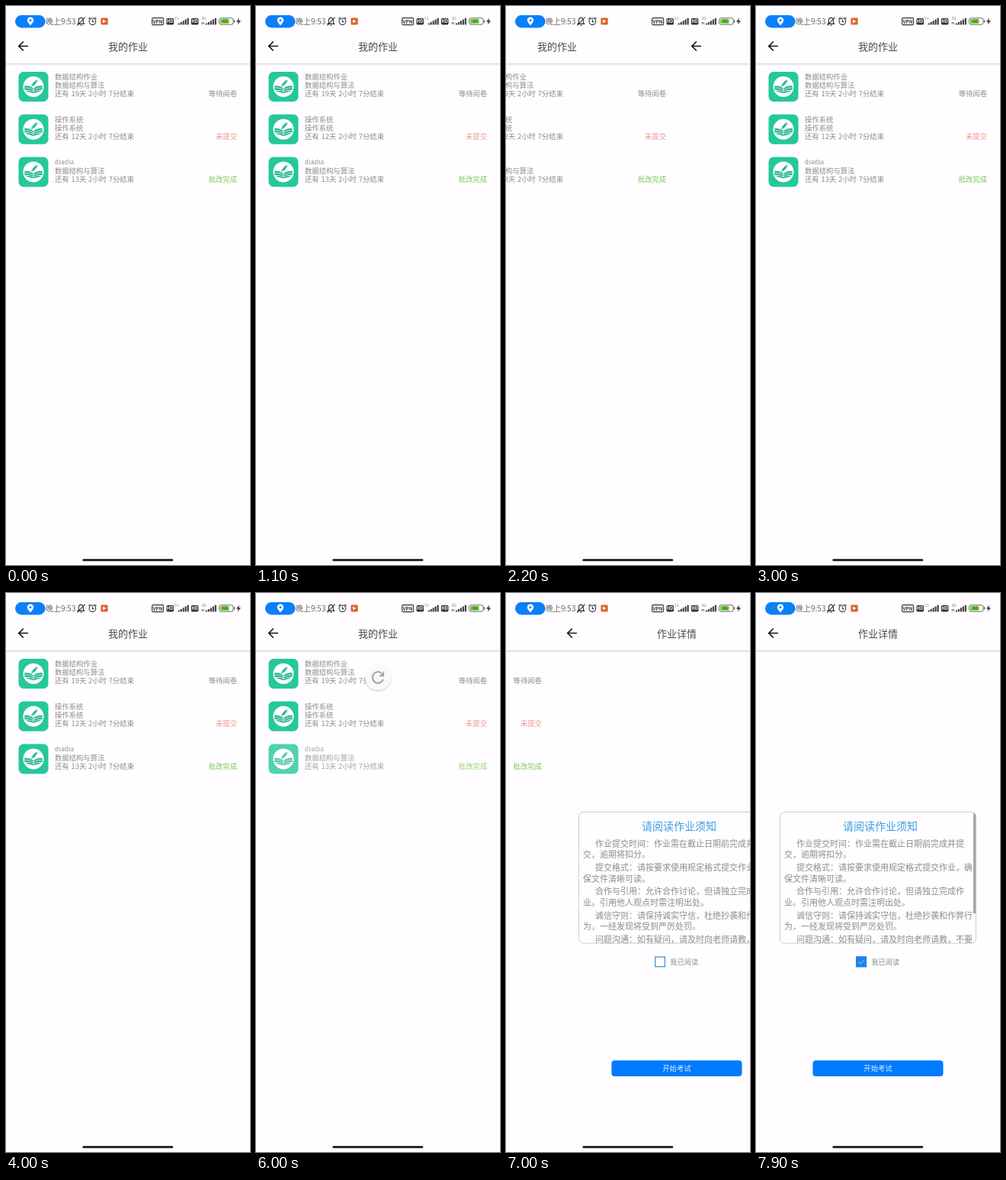
Animation of 320x731 px, one loop 8000 ms. Source, as an HTML page:

```html
<!DOCTYPE html>
<html lang="zh-CN">
<head>
<meta charset="utf-8">
<title>我的作业</title>
<style>
  html, body { margin: 0; width: 100%; height: 100%; overflow: hidden; background: #fffdff; }
  svg { display: block; width: 100%; height: 100%; }
  text { font-family: "Noto Sans CJK SC", "Noto Sans CJK", sans-serif; font-weight: 300; word-spacing: .8px; }
</style>
</head>
<body>
<svg viewBox="0 0 320 731" xmlns="http://www.w3.org/2000/svg">
  <defs>
    <linearGradient id="edge" x1="0" y1="0" x2="0" y2="1">
      <stop offset="0" stop-color="#d9d7d9"/>
      <stop offset="1" stop-color="#d9d7d9" stop-opacity="0"/>
    </linearGradient>
    <filter id="soft" x="-40%" y="-40%" width="180%" height="180%">
      <feDropShadow dx="0" dy="1" stdDeviation="1.3" flood-opacity=".25"/>
    </filter>
    <clipPath id="cardClip"><rect x="31.5" y="286.5" width="257" height="171.5" rx="6"/></clipPath>
    <path id="back" d="M29 52.5H17M22.8 46.5L16.8 52.5L22.8 58.5" fill="none" stroke="#161616" stroke-width="1.7"/>
    <g id="icon">
      <rect width="39" height="39" rx="6.5" fill="#25c89b"/>
      <circle cx="19.5" cy="19.5" r="13.5" fill="#fff"/>
      <g fill="#25b58f">
        <path d="M7.8 18.4Q14.5 17.8 19 21.4V26Q14 23 7.8 23.8Z"/>
        <path d="M31.2 18.4Q24.5 17.8 20 21.4V26Q25 23 31.2 23.8Z"/>
        <path d="M8.8 25Q15 23.8 19.5 26.8Q24 23.8 30.2 25L19.5 28.2Z"/>
        <path d="M16.2 20L17 16.6L23 10L25.6 12.3L19.6 18.8Z" stroke="#fff" stroke-width=".6"/>
      </g>
      <path d="M8.2 21Q14 20.2 18.8 23.6M30.8 21Q25 20.2 20.2 23.6M17.6 17L19.4 18.4M21.9 11.2L24.5 13.5" fill="none" stroke="#fff" stroke-width=".7"/>
    </g>
    <g id="hd">
      <rect width="9.6" height="8.4" rx="1.6" fill="#333"/>
      <text x="4.8" y="6.2" font-size="5.6" text-anchor="middle" fill="#fff" style="font-weight:700">HD</text>
    </g>
  </defs>

  <g id="list"></g>
  <g id="detail">
    <g id="waiting"></g>
    <g id="notice"></g>
  </g>
  <rect y="75" width="320" height="3" fill="url(#edge)"/>

  <g id="spinner">
    <circle r="16.8" fill="#fbfafb" filter="url(#soft)"/>
    <g id="arrow">
      <path d="M6.9 2.6A7.3 7.3 0 1 1 4.6 -5.6" fill="none" stroke="#a6a6a6" stroke-width="2.1"/>
      <path d="M8 -8V-1H1Z" fill="#a6a6a6"/>
    </g>
  </g>

  <g id="status">
    <rect x="12" y="12" width="39.6" height="16.4" rx="8.2" fill="#0b80fa"/>
    <path d="M32 25.4Q27.8 21 27.8 18.8A4.2 4.2 0 0 1 36.2 18.8Q36.2 21 32 25.4Z" fill="#fff"/>
    <circle cx="32" cy="18.8" r="1.5" fill="#0b80fa"/>
    <g fill="none" stroke="#333" stroke-width="1.1">
      <path d="M94.2 23.4H102.6L101.4 21.6V18.4A3 3 0 0 0 95.4 18.4V21.6ZM97.2 25.2H99.8M93.4 25.6L103.6 14.6"/>
      <circle cx="113.4" cy="20.3" r="4.3"/>
      <path d="M113.4 17.8V20.6H115.5M108.2 16.9L110.8 14.9M118.6 16.9L116 14.9"/>
      <rect x="191.6" y="15.6" width="15" height="9" rx="1.4"/>
    </g>
    <rect x="124.4" y="15.6" width="9.2" height="8.8" rx="1.2" fill="#df632c"/>
    <path d="M127 17.7L131.4 20L127 22.3Z" fill="#fff"/>
    <use href="#hd" x="210.4" y="16"/>
    <use href="#hd" x="242.8" y="16"/>
    <path d="M257.2 23.8V21M259.2 21V23.8" stroke="#555" stroke-width="1"/>
    <g id="bars" fill="#333"></g>
    <rect x="279.6" y="15.8" width="18.4" height="8.4" rx="2.4" fill="#fff" stroke="#555" stroke-width=".9"/>
    <rect x="281" y="17.2" width="11.6" height="5.6" rx="1" fill="#6cc832"/>
    <path d="M299.5 18.3V21.7" stroke="#555" stroke-width="1.2"/>
    <path d="M306 15.6L302 20.8H304.6L303.8 24.6L308 19.2H305.2Z" fill="#333"/>
  </g>
  <rect x="100.3" y="723" width="119" height="3" rx="1.5" fill="#2c2b2e"/>
</svg>

<script>
const $ = id => document.getElementById(id);
const LOOP = 8000, STEP = 100, WIDTH = 320;
const BLUE = '#007aff', LINK = '#3a9de4', GREY = '#8c8c8c', DARK = '#4a4a4a';

// y is the vertical centre of the line
const label = (s, x, y, size, fill, anchor = 'start', weight = 300) =>
  `<text x="${x}" y="${y + size * 0.37}" font-size="${size}" fill="${fill}" ` +
  `text-anchor="${anchor}" style="font-weight:${weight}">${s}</text>`;

const header = title => '<use href="#back"/>' + label(title, 160, 53, 13, DARK, 'middle');

const homework = [
  ['数据结构作业', '数据结构与算法', 19, '等待阅卷', GREY],
  ['操作系统', '操作系统', 12, '未提交', '#e59a8e'],
  ['dsadsa', '数据结构与算法', 13, '批改完成', '#78ca54']
];
$('list').innerHTML = header('我的作业') + homework.map(([name, course, days, state, color], i) => {
  const y = 86 + i * 55.7;
  return `<g class="row"><use href="#icon" x="16.5" y="${y}"/>` +
    label(name, 64, y + 6.6, name === 'dsadsa' ? 7.6 : 9.33, GREY) +
    label(course, 64, y + 17.8, 9.33, GREY) +
    label(`还有 ${days}天 2小时 7分结束`, 64, y + 29, 9.33, GREY) +
    label(state, 303, y + 29, 9.33, color, 'end') + '</g>';
}).join('');
const lastRow = $('list').querySelector('.row:last-child');

$('detail').insertAdjacentHTML('afterbegin', header('作业详情'));
$('waiting').innerHTML = label('等待阅卷', 160.5, 93.5, 13.2, LINK, 'middle');

const rules = [
  ['作业提交时间：作业需在截止日期前完成并提', '交，逾期将扣分。'],
  ['提交格式：请按要求使用规定格式提交作业，确', '保文件清晰可读。'],
  ['合作与引用：允许合作讨论，但请独立完成作', '业。引用他人观点时需注明出处。'],
  ['诚信守则：请保持诚实守信，杜绝抄袭和作弊行', '为，一经发现将受到严厉处罚。'],
  ['问题沟通：如有疑问，请及时向老师请教，不要', '']
];
$('notice').innerHTML =
  '<rect x="31.5" y="286.5" width="257" height="171.5" rx="6" fill="none" stroke="#c8c6c8" stroke-width=".9"/>' +
  '<g clip-path="url(#cardClip)">' +
  label('请阅读作业须知', 163, 305, 14, LINK, 'middle') +
  rules.map(([first, rest], i) =>
    label(first, 53, 328 + i * 31.2, 11, GREY) +
    label(rest, 37, 342.4 + i * 31.2, 11, GREY)).join('') +
  '<rect x="285" y="287" width="3.2" height="132" fill="#a6a4a6"/></g>' +
  '<rect x="131.7" y="475.9" width="12.8" height="12.8" fill="none" stroke="#3a8fd6" stroke-width="1.2"/>' +
  '<g id="check"><rect x="131" y="475.2" width="14" height="14" fill="#1c84ee"/>' +
  '<path d="M134.4 482.4L137 485L141.8 479.8" fill="none" stroke="#d4e8fc" stroke-width=".8"/></g>' +
  label('我已阅读', 151.4, 482.6, 9.2, GREY) +
  `<rect x="74.5" y="611.2" width="171" height="20.8" rx="4" fill="${BLUE}"/>` +
  label('开始考试', 160, 622, 9.33, '#e4f0ff', 'middle');

$('status').insertAdjacentHTML('beforeend',
  label('晚上9:53', 52, 20.2, 10, '#666') +
  label('VPN', 199.1, 20.2, 6.4, '#333', 'middle', 700) +
  label('5G', 220.8, 16.6, 5, '#999') +
  label('3G', 256.4, 16.6, 5, '#777') +
  label('66', 287.6, 20.1, 6, '#2c5a14', 'middle', 500));
$('bars').innerHTML = [225.6, 261.8].map(x => [0, 1, 2, 3, 4].map(i => {
  const h = 2 + i * 1.7;
  return `<rect x="${x + i * 3}" y="${24.6 - h}" width="2" height="${h}" rx=".5"/>`;
}).join('')).join('');

const ramp = (t, start, length) => Math.min(1, Math.max(0, (t - start) / length));
const ease = p => 0.5 - 0.5 * Math.cos(Math.PI * p);
const slide = (t, start) => ease(ramp(t, start, 400));

function draw(t) {
  const open = slide(t, 1200) - slide(t, 1945) + slide(t, 6718);
  $('list').setAttribute('transform', `translate(${-WIDTH * open})`);
  $('detail').setAttribute('transform', `translate(${WIDTH * (1 - open)})`);

  const second = t >= 4000;
  $('waiting').setAttribute('display', second ? 'none' : 'inline');
  $('notice').setAttribute('display', second ? 'inline' : 'none');
  $('check').setAttribute('opacity', ramp(t, 7600, 300));

  // The refreshed last row fades back in while the spinner turns
  lastRow.setAttribute('opacity', t < 6000 ? 1 : 0.8 + 0.2 * ramp(t, 6000, 200));
  const size = t < 6000 ? 0 : 1 - ramp(t, 6450, 250);
  $('spinner').setAttribute('display', size > 0 ? 'inline' : 'none');
  $('spinner').setAttribute('transform', `translate(160 110.3) scale(${size})`);
  $('arrow').setAttribute('transform', `rotate(${Math.max(0, t - 6000) * 0.45})`);
}

// The screen refreshes ten times a second
const origin = performance.now();
function tick() {
  const t = (performance.now() - origin) % LOOP;
  draw(Math.floor(t / STEP) * STEP);
  requestAnimationFrame(tick);
}
tick();
</script>
</body>
</html>
```
